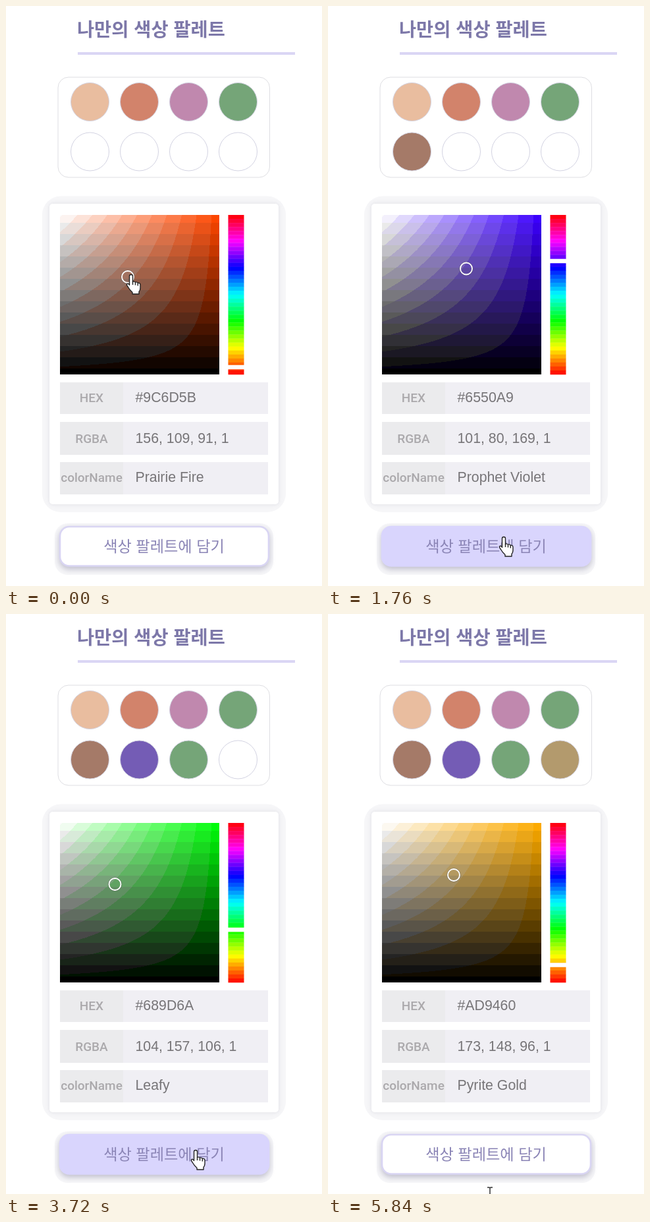
These frames come from a looping animation (480x880 px, 5.88 s). An HTML page with a canvas:

```html
<!DOCTYPE html>
<html lang="ko">
<head>
<meta charset="utf-8">
<title>색상 팔레트</title>
<style>
  html, body { margin: 0; width: 100%; height: 100%; overflow: hidden; background: #fff; }
  svg, canvas { position: absolute; left: 0; top: 0; display: block; }
  #area { left: 82px; top: 317px; }
  .ko { font-family: "Noto Sans CJK KR", "Noto Sans CJK", sans-serif; }
  .title { font-size: 28.4px; font-weight: 700; fill: #7d78a9; }
  .save { font-size: 23.2px; fill: #8b85b6; text-anchor: middle; }
  .label { font: 500 19px Roboto, sans-serif; fill: #aba9ac; text-anchor: middle; }
  .value { font: 21.3px "Liberation Sans", Arial, sans-serif; fill: #777578; }
  .halo { filter: drop-shadow(0 0 3px rgba(60, 60, 90, .13)); }
  .lift { filter: drop-shadow(0 4px 4px rgba(70, 65, 110, .3)); }
</style>
</head>
<body>
<svg id="base" width="480" height="880" viewBox="0 0 480 880">
  <text class="ko title" x="108" y="46">나만의 색상 팔레트</text>
  <rect x="109" y="70" width="330" height="4" fill="#dad6f4"/>
  <rect x="79" y="108" width="321.5" height="152" rx="16" fill="#fff" stroke="#dedee2"/>
  <g id="swatches" stroke="#d3d3e2"></g>
  <rect x="55" y="288.500" width="370" height="479.500" rx="28" fill="#f6f6f8"/>
  <rect class="halo" x="66" y="300" width="348" height="456" rx="5" fill="#fff"/>
  <g id="hues"></g>
  <rect id="gap" x="336" width="28" height="6.500" fill="#fff"/>
  <g id="rows"></g>
  <rect x="74" y="785" width="332" height="78" rx="20" fill="#f6f6f8"/>
  <rect id="button" class="lift" x="82" y="790" width="317" height="59.500" rx="14" stroke="#d9d5f3" stroke-width="2.600"/>
  <text class="ko save" x="240" y="828">색상 팔레트에 담기</text>
</svg>
<canvas id="area" width="242" height="242"></canvas>
<svg id="over" width="480" height="880" viewBox="0 0 480 880">
  <g id="marker">
    <circle id="rim" r="10.200" fill="none" stroke="#555" stroke-opacity=".45"/>
    <circle id="ring" r="9" fill="none" stroke="#fff" stroke-width="1.800"/>
  </g>
  <g id="cursor" stroke-linejoin="round">
    <g id="hand" fill="#fff" stroke="#222" stroke-width="1.400">
      <path d="M-2.500 1a2.500 2.500 0 0 1 5 0V9.500q2-1.500 4 .7q2.200-1 3.800 1q3.700-.4 3.700 3.300V19q0 3-2 5.500V28H2V25.500Q-2 22-4.500 17.500-7 14.500-6.500 13-4.500 11-2.500 14.500Z"/>
      <path d="M2.500 9v5M6.500 10.500v4M10.300 11.500v4"/>
    </g>
    <path id="arrow" d="M0 0V20L4.600 16 7.800 23.500 11 22 7.800 14.800H14Z" fill="#fff" stroke="#222" stroke-width="1.400"/>
    <path id="beam" d="M-4-10H-1L0-9 1-10H4M0-9V9M-4 10H-1L0 9 1 10H4" fill="none" stroke="#333" stroke-width="1.500"/>
  </g>
</svg>
<script>
const LOOP = 5880, STEP = 40, SIZE = 242;
const AREA = { x: 82, y: 317 }, BAR = { x: 337.5, w: 24 };
const byId = id => document.getElementById(id);

function add(parent, tag, attrs, text) {
  const el = document.createElementNS("http://www.w3.org/2000/svg", tag);
  for (const k in attrs) el.setAttribute(k, attrs[k]);
  if (text) el.textContent = text;
  return byId(parent).appendChild(el);
}

// time, hex, name, marker x and y, hue gap y
const picks = [
  [0, "#9C6D5B", "Prairie Fire", 185, 411, 548],
  [1240, "#3C00FF", "Electric Ultramarine", 326, 317, 387],
  [1480, "#6550A9", "Prophet Violet", 210, 398.5, 387],
  [2160, "#00FF08", "EGA Green", 326, 317, 479],
  [2560, "#689D6A", "Leafy", 165.5, 410, 479],
  [4000, "#FFAD00", "Fresh Squeezed", 326, 317, 532.5],
  [4320, "#AD9460", "Pyrite Gold", 191, 396, 532.5]
];

// swatch colour, time it is filled
const saved = [
  ["#e9bd9f", 0], ["#d2836b", 0], ["#c088ae", 0], ["#75a578", 0],
  ["#a57a68", 720], ["#745cb5", 1880], ["#75a578", 3720], ["#b39a6d", 4960]
];

// time, x, y of the pointer
const path = [
  [0, 190, 409], [80, 190, 409], [400, 262, 835], [640, 262, 815], [760, 262, 815],
  [1080, 358, 390], [1240, 356, 387], [1440, 210, 398], [1520, 210, 398],
  [1760, 267, 807], [1920, 267, 810], [2120, 349, 479], [2160, 349, 479],
  [2240, 318, 465], [2520, 165, 410], [2720, 167, 412], [3000, 255, 712],
  [3120, 296, 799], [3240, 290, 815], [3760, 288, 815], [3960, 349, 532],
  [4040, 349, 532], [4240, 199, 397], [4320, 191, 396], [4440, 191, 396],
  [4700, 258, 842], [5000, 256, 842], [5400, 250, 865], [5840, 246, 880], [5880, 246, 880]
];

const rgbOf = hex => [1, 3, 5].map(i => parseInt(hex.slice(i, i + 2), 16));
const snap = (v, step) => Math.min(255, Math.round(v / step) * step);

const dots = saved.map((s, i) => add("swatches", "circle", {
  cx: 127.5 + (i % 4) * 75, cy: i < 4 ? 145.5 : 221, r: 29
}));

const BANDS = 40;
for (let i = 0; i < BANDS; i++) {
  const h = SIZE / BANDS;
  add("hues", "rect", {
    x: BAR.x, y: AREA.y + i * h, width: BAR.w, height: h + .3,
    fill: `hsl(${360 - (i + .5) * 360 / BANDS} 100% 50%)`
  });
}

const values = [["HEX", 571, 48], ["RGBA", 631, 50], ["colorName", 692, 49]].map(([name, y, h], i) => {
  const base = [601, 662.5, 722][i];
  add("rows", "rect", { x: 82, y, width: 96, height: h, fill: "#ebebed" });
  add("rows", "rect", { x: 178, y, width: 220, height: h, fill: "#f0eff4" });
  add("rows", "text", { class: "label", x: 130, y: base }, name);
  return add("rows", "text", { class: "value", x: 196.5, y: base }, " ");
});

// Saturation and brightness field with coarse colour steps
function paintArea(rgb) {
  const hi = Math.max(...rgb), lo = Math.min(...rgb);
  const mix = rgb.map(c => (c - lo) / (hi - lo));
  const ctx = byId("area").getContext("2d");
  const img = ctx.createImageData(SIZE, SIZE);
  for (let y = 0, p = 0; y < SIZE; y++) {
    const v = 255 * (1 - y / (SIZE - 1)), top = snap(v, 18);
    for (let x = 0; x < SIZE; x++) {
      const low = Math.min(top, snap(v * (1 - x / (SIZE - 1)), 24));
      for (const m of mix) img.data[p++] = low + (top - low) * m;
      img.data[p++] = 255;
    }
  }
  ctx.putImageData(img, 0, 0);
}

let shown = null;
function showPick(pick) {
  if (pick === shown) return;
  shown = pick;
  const [, hex, name, x, y, gap] = pick;
  const rgb = rgbOf(hex), corner = x > 325;
  [hex, rgb.join(", ") + ", 1", name].forEach((s, i) => values[i].textContent = s);
  byId("marker").setAttribute("transform", `translate(${x} ${y})`);
  byId("ring").setAttribute("fill", corner ? "#fff" : "none");
  byId("gap").setAttribute("y", gap - 3.25);
  paintArea(rgb);
}

function pointerAt(t) {
  const i = Math.max(1, path.findIndex(k => k[0] > t));
  const [t0, x0, y0] = path[i - 1], [t1, x1, y1] = path[i];
  const u = (t - t0) / (t1 - t0), e = u * u * (3 - 2 * u);
  return [x0 + (x1 - x0) * e, y0 + (y1 - y0) * e];
}

const inside = (x, y, l, t, r, b) => x >= l && x <= r && y >= t && y <= b;

function render(t) {
  showPick(picks.filter(p => p[0] <= t).pop());
  dots.forEach((d, i) => d.setAttribute("fill", t >= saved[i][1] ? saved[i][0] : "#fff"));

  const [x, y] = pointerAt(t);
  const hover = inside(x, y, 82, 803, 399, 850);
  const onPicker = inside(x, y, 82, 317, 317, 559) || inside(x, y, 337, 317, 362, 559);
  const kind = hover || onPicker ? "hand" : y < 565 ? "arrow" : "beam";
  for (const id of ["hand", "arrow", "beam"])
    byId(id).setAttribute("visibility", id === kind ? "visible" : "hidden");
  byId("cursor").setAttribute("transform", `translate(${x} ${y})`);
  const button = byId("button");
  button.setAttribute("fill", hover ? "#d9d5fd" : "#fff");
  button.setAttribute("stroke", hover ? "#d9d5fd" : "#d9d5f3");
}

const start = performance.now();
function tick() {
  const t = (performance.now() - start) % LOOP;
  render(Math.floor(t / STEP) * STEP);
  requestAnimationFrame(tick);
}
tick();
</script>
</body>
</html>
```
